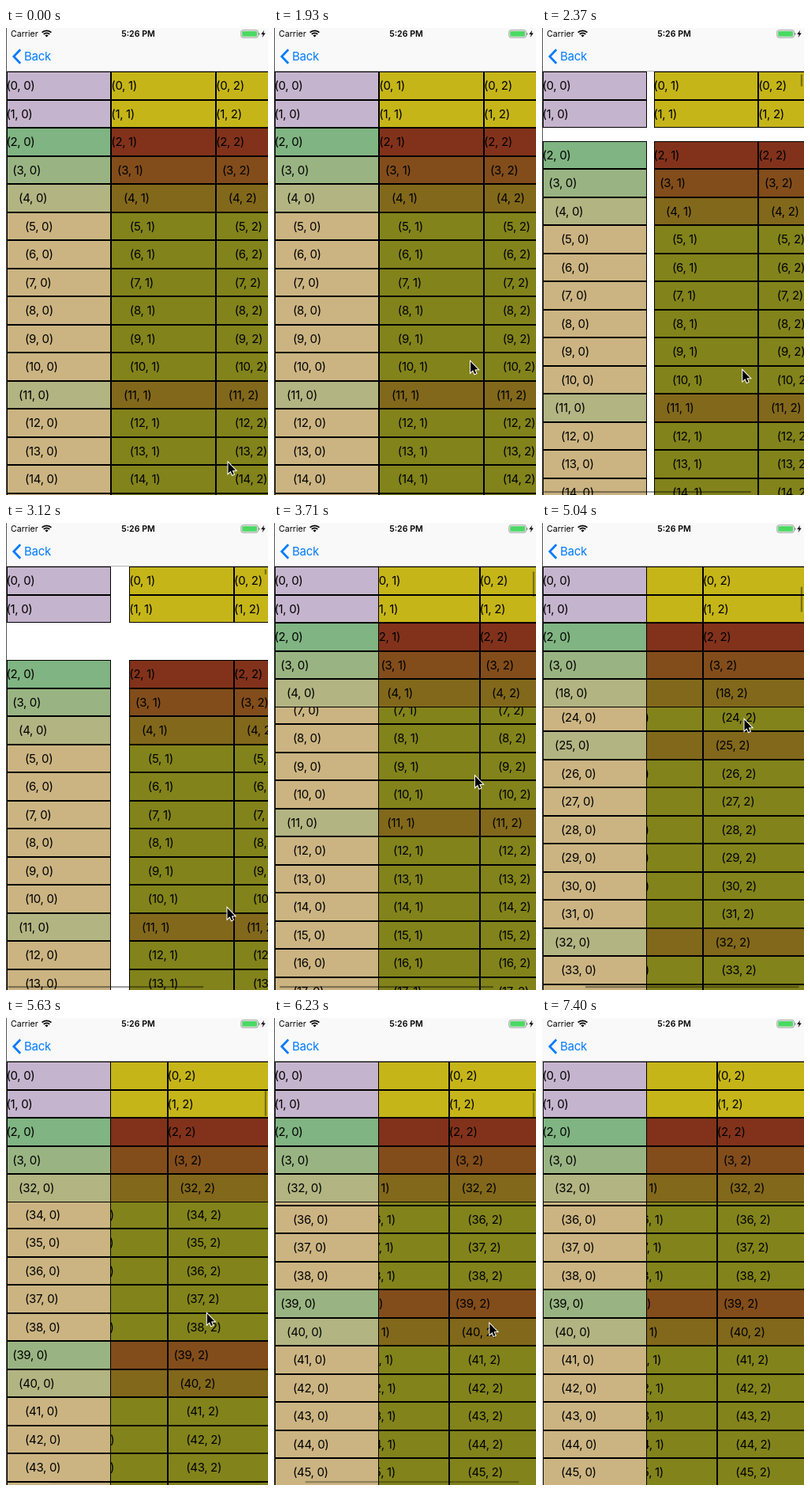
Write an HTML page with a canvas that moves like this. It is 332 by 590 pixels and loops after 7500 ms.

```html
<!DOCTYPE html>
<html lang="en">
<head>
<meta charset="utf-8">
<title>Sticky grid</title>
<style>
  html, body { margin: 0; width: 100%; height: 100%; overflow: hidden; background: #fff; }
  canvas { display: block; }
</style>
</head>
<body>
<canvas id="stage" width="332" height="590"></canvas>
<script>
const ctx = document.getElementById('stage').getContext('2d');
const W = 332, H = 590, LOOP = 7500, STEP = 148;
const TOP = 55.4, ROW = 35.5, COL = 132.85, LEFT = 0.6, INDENT = 7.85;

// each move: first step, last step, destination x, destination y
const SCROLL = [
  [14, 19, -23, -47], [21, 29, 34.4, 217], [29, 34, 62.4, 679.5],
  [34, 38, 61.5, 1031.5], [38, 40, 44.3, 1096.5]
];
const POINTER = [
  [0, 2, 283, 556], [7, 10, 253, 433], [12, 13, 249, 421.5], [13, 14, 240, 403],
  [14, 19, 280.5, 486.5], [21, 25, 255, 320], [25, 29, 251.2, 339.5],
  [29, 34, 256.5, 248.5], [34, 38, 254.8, 373.5], [38, 40, 271, 308], [41, 44, 280, 610]
];
const ARROW = new Path2D('M0 0V13.6L3.1 10.7 5.2 15.6 7.3 14.7 5.2 9.9 9.5 9.8Z');
const BOLT = new Path2D('M327.2 2.8L323.2 8H325.8L324.6 12 328.8 6.6H326.2Z');
const CHEVRON = new Path2D('M18.2 27.3L9.8 36 18.2 44.7');

function follow(moves, x, y, step) {
  for (const [from, to, endX, endY] of moves) {
    const p = Math.min(1, Math.max(0, (step - from) / (to - from)));
    const eased = p * p * (3 - 2 * p);
    x += (endX - x) * eased;
    y += (endY - y) * eased;
  }
  return [x, y];
}

function level(row) {
  if (row < 3) return 0;
  const place = (row - 3) % 36;
  return place === 0 ? 1 : place % 7 === 1 ? 2 : 3;
}

function cellColor(row, col) {
  if (row < 2) return col ? '#c5b518' : '#c5b4cd';
  const n = level(row);
  return col ? `rgb(130,${50 + 27 * n},27)` : `rgb(${128 + 25 * n},180,130)`;
}

function text(str, x, y, size, { color = '#000', weight = 400, align = 'left', spacing = 0 } = {}) {
  ctx.font = `${weight} ${size}px Inter, sans-serif`;
  ctx.letterSpacing = spacing + 'px';
  ctx.textAlign = align;
  ctx.fillStyle = color;
  ctx.fillText(str, x, y);
}

function drawRow(row, y, scrollX) {
  const top = Math.round(y), height = Math.round(y + ROW) - top;
  for (let col = 2; col >= 0; col--) {
    const x = LEFT + col * COL - (col ? scrollX : 0);
    const left = Math.round(x), width = Math.round(x + COL) - left;
    ctx.fillStyle = '#000';
    ctx.fillRect(left, top, width, height);
    ctx.fillStyle = cellColor(row, col);
    ctx.fillRect(left + 1, top + 1, width - 2, height - 2);
    text(`(${row}, ${col})`, x - 0.2 + level(row) * INDENT, y + 23, 15, { spacing: -0.34 });
  }
}

function drawGrid(scrollX, scrollY) {
  const slot = row => TOP + row * ROW;
  const place = row => slot(row) - scrollY;
  const first = Math.max(2, Math.floor(scrollY / ROW));
  for (let row = first; place(row) < H; row++) drawRow(row, place(row), scrollX);

  // the current group header stays below rows 2 and 3 until the next one pushes it up
  let group = 4;
  for (let row = 5; place(row) <= slot(4); row++) if (level(row) === 2) group = row;
  let next = group + 1;
  while (level(next) === 3) next++;
  drawRow(group, Math.min(Math.max(slot(4), place(group)), place(next) - ROW), scrollX);
  for (const row of [3, 2]) drawRow(row, Math.max(slot(row), place(row)), scrollX);
  for (const row of [1, 0]) drawRow(row, slot(row), scrollX);
}

function bar(x, y, w, h, r) {
  ctx.beginPath();
  ctx.roundRect(x, y, w, h, r);
}

function drawIndicators(scrollX, scrollY, alpha) {
  if (alpha <= 0) return;
  ctx.fillStyle = `rgba(0,0,0,${0.38 * alpha})`;
  bar(2.3 + 0.84 * Math.max(0, scrollX), 585, 271 + Math.min(0, scrollX), 2.3, 1.1);
  ctx.fill();
  bar(327.8, 58.5 + 0.0325 * Math.max(0, scrollY), 2.3, Math.max(6.5, 32 + Math.min(0, scrollY)), 1.1);
  ctx.fill();
}

function drawTopBar() {
  ctx.fillStyle = '#f9f9f9';
  ctx.fillRect(0, 0, W, 55);
  ctx.fillStyle = '#b2b2b2';
  ctx.fillRect(0, 54, W, 1);
  text('Carrier', 6, 11.3, 10.6);
  text('5:26 PM', 167.5, 11.3, 10.6, { weight: 600, align: 'center' });

  // signal: two arcs above a filled wedge
  ctx.strokeStyle = '#000';
  ctx.lineWidth = 1.8;
  for (const radius of [8.3, 5.3, 1.5]) {
    ctx.beginPath();
    ctx.arc(51.5, 11.6, radius, -Math.PI * 0.75, -Math.PI * 0.25);
    if (radius < 2) ctx.lineWidth = 3;
    ctx.stroke();
  }

  ctx.strokeStyle = ctx.fillStyle = '#8e8e8e';
  ctx.lineWidth = 0.9;
  bar(297.9, 2.7, 21.4, 9.4, 2.2);
  ctx.stroke();
  ctx.fillRect(320.2, 6, 1.2, 3);
  ctx.fillStyle = '#4cd964';
  bar(299.2, 4, 18.8, 6.8, 1);
  ctx.fill();
  ctx.fillStyle = '#000';
  ctx.fill(BOLT);

  ctx.strokeStyle = '#007aff';
  ctx.lineWidth = 2.7;
  ctx.stroke(CHEVRON);
  text('Back', 23, 41.3, 15, { color: '#007aff', spacing: -0.3 });
}

function drawPointer(x, y) {
  ctx.save();
  ctx.translate(x, y);
  ctx.strokeStyle = '#fff';
  ctx.lineWidth = 2;
  ctx.stroke(ARROW);
  ctx.fillStyle = '#000';
  ctx.fill(ARROW);
  ctx.restore();
}

function render(time) {
  const step = Math.floor(time / STEP);
  const [scrollX, scrollY] = follow(SCROLL, 0, 0, step);
  ctx.fillStyle = '#fff';
  ctx.fillRect(0, 0, W, H);
  drawGrid(scrollX, scrollY);
  drawIndicators(scrollX, scrollY, step < 15 ? 0 : Math.min(1, (45 - step) / 4));
  drawTopBar();
  if (step < 50) {
    ctx.fillStyle = '#555';
    ctx.fillRect(0, 0, 1, H);
  }
  drawPointer(...follow(POINTER, 281.5, 549, step));
}

const start = performance.now();
function tick() {
  render((performance.now() - start) % LOOP);
  requestAnimationFrame(tick);
}
tick();
</script>
</body>
</html>
```
